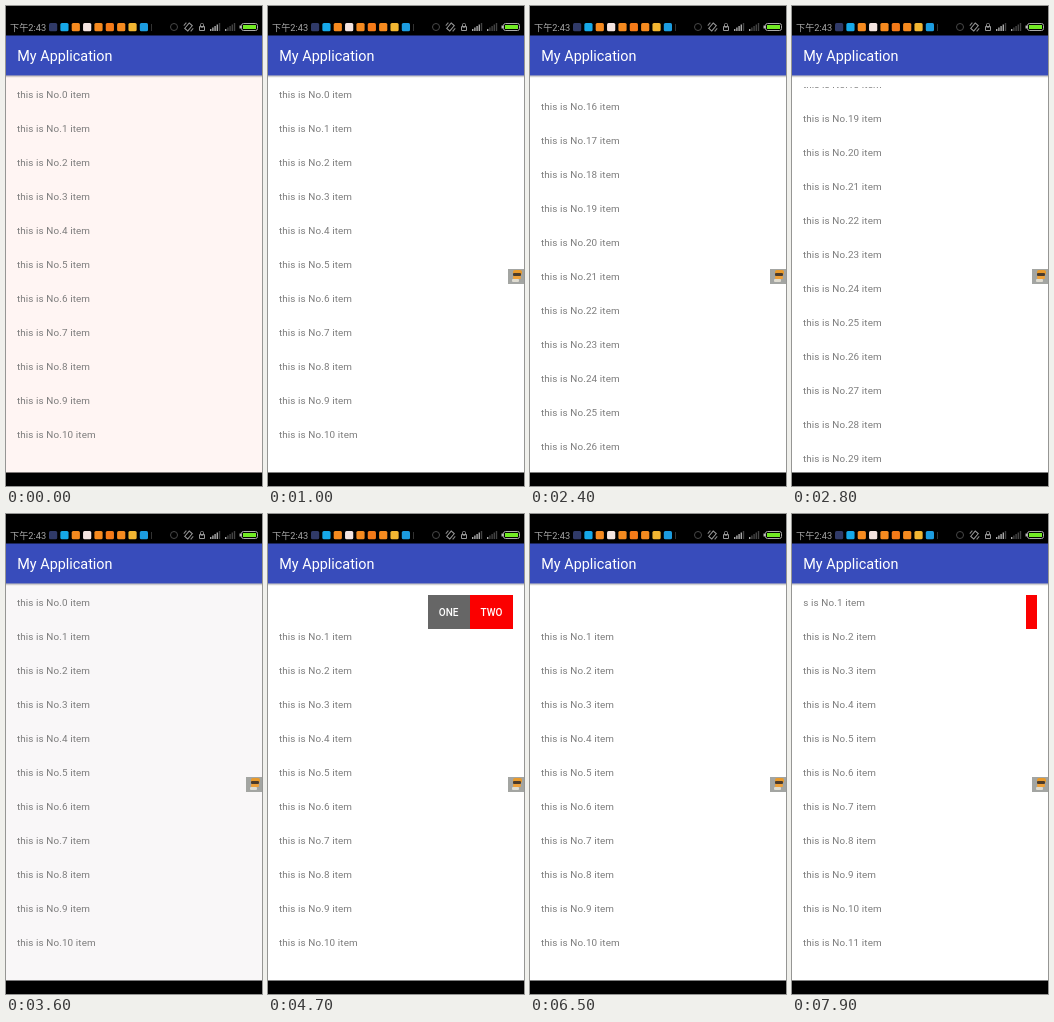
An HTML page with a canvas for the animation above (8000 ms loop, 256 by 480 pixels).

```html
<!DOCTYPE html>
<html lang="en">
<head>
<meta charset="utf-8">
<title>Swipe list</title>
<style>
  html, body { margin: 0; width: 100%; height: 100%; overflow: hidden; background: #000; }
  canvas { display: block; width: 256px; height: 480px; }
</style>
</head>
<body>
<canvas id="stage"></canvas>
<script>
const W = 256, H = 480, LOOP = 8000, STEP = 100;
const LIST = { x: 11, y: 81, w: 234, h: 375 };
const ROW = 34, COUNT = 30, MENU = 85;
const MAX_SCROLL = COUNT * ROW - LIST.h;
const REMOVED_AT = 6500;
const SANS = 'Roboto, sans-serif';

const canvas = document.getElementById('stage');
const ctx = canvas.getContext('2d');
const dpr = window.devicePixelRatio || 1;
canvas.width = W * dpr;
canvas.height = H * dpr;

// Eased 0 to 1 between two times
function ramp(t, from, to) {
  const p = Math.min(1, Math.max(0, (t - from) / (to - from)));
  return p * p * (3 - 2 * p);
}

function pose(t) {
  return {
    scroll: Math.round(MAX_SCROLL * (ramp(t, 1721, 2647) - ramp(t, 2700, 3580))),
    swipes: [
      MENU * (ramp(t, 4340, 4700) - ramp(t, 5000, 5600) + ramp(t, 5900, 6200)),
      11 * ramp(t, 7400, 7900)
    ],
    lift: Math.round(ROW * ramp(t, REMOVED_AT, 6900)),
    removed: t >= REMOVED_AT,
    warm: 1 - ramp(t, 0, 400),
    grey: ramp(t, 3400, 3600) - ramp(t, 3600, 4200)
  };
}

function rect(x, y, w, h, color, radius = 0) {
  ctx.fillStyle = color;
  ctx.beginPath();
  ctx.roundRect(x, y, w, h, radius);
  ctx.fill();
}

function label(text, x, y, font, color, spacing = 0) {
  ctx.font = font;
  ctx.letterSpacing = spacing + 'px';
  ctx.fillStyle = color;
  ctx.fillText(text, x, y);
}

function outline(x, y, w, h, color, radius = 0) {
  ctx.strokeStyle = color;
  ctx.lineWidth = 1;
  ctx.beginPath();
  ctx.roundRect(x, y, w, h, radius);
  ctx.stroke();
}

function signal(x, bright) {
  for (let i = 0; i < 5; i++) {
    rect(x + i * 2.2, 23 - i * 1.5, 1.4, 2 + i * 1.5, i < bright ? '#aaa' : '#444');
  }
}

function phone(x, y) {
  ctx.save();
  ctx.translate(x, y);
  ctx.rotate(0.7);
  outline(-2, -3.5, 4, 7, '#999');
  rect(-5, -2, 1, 4, '#888');
  rect(4, -2, 1, 4, '#888');
  ctx.restore();
}

function statusBar() {
  rect(0, 0, W, 30, '#000');
  label('下午2:43', 4, 24.5, '9.2px Roboto, "Noto Sans CJK SC", "Noto Sans CJK", sans-serif', '#a8a8a8');
  ['#303a68', '#16a8e8', '#f58a1f', '#f4e4e0', '#f58a1f', '#f47a18', '#f58a1f', '#f2b632', '#1c9ce0']
    .forEach((color, i) => rect(43 + i * 11.35, 17, 8.2, 8.2, color, 1.5));
  rect(145, 18, 1, 7, '#333');

  outline(164.5, 17.5, 7, 7, '#484848', 3.5);
  phone(182.5, 21);
  outline(194.5, 17.5, 3, 4, '#888', 1);
  outline(193.5, 20.5, 5, 4, '#999');
  signal(204, 4);
  signal(219, 1);

  rect(233.5, 19.5, 2, 3, '#bbb');
  outline(235.5, 17.5, 16, 7, '#aaa', 2);
  rect(237, 19, 13, 4, '#72ea24');
}

function toolbar() {
  rect(0, 29.6, W, 39.9, '#384cbb');
  rect(0, 69.5, W, 1, 'rgba(0,0,0,.28)');
  rect(0, 70.5, W, 1, 'rgba(0,0,0,.08)');
  label('My Application', 11.3, 55, '14.4px ' + SANS, '#fff');
}

function menu(y) {
  rect(160, y, 42, ROW, '#666');
  rect(202, y, 43, ROW, '#fb0000');
  label('ONE', 170.8, y + 21, '500 10px ' + SANS, '#fff');
  label('TWO', 212.6, y + 21, '500 10px ' + SANS, '#fff');
}

function list({ scroll, lift, swipes, removed }, paper) {
  ctx.save();
  ctx.beginPath();
  ctx.rect(LIST.x, LIST.y, LIST.w, LIST.h);
  ctx.clip();
  for (let i = removed ? 1 : 0; i < COUNT; i++) {
    const y = LIST.y + i * ROW - scroll - lift;
    const shift = swipes[i] || 0;
    if (shift > 0) {
      menu(y);
      rect(LIST.x - shift, y, LIST.w, ROW, paper);
    }
    label(`this is No.${i} item`, LIST.x - shift, y + 11, '9.9px ' + SANS, '#7c7c7c', 0.1);
  }
  ctx.restore();
}

function floatingBadge() {
  rect(240, 263, 16, 15, '#a3a5a2');
  rect(245, 264, 9, 5, '#e89a2c', 2);
  rect(245, 267, 8, 3, '#4c3b2a', 1);
  rect(245, 270, 8, 3, '#eda03a', 1);
  rect(244, 273, 7, 3, '#dedbd0', 1);
}

function draw(t) {
  const state = pose(t);
  const { warm, grey } = state;
  const paper = `rgb(${255 - 6 * grey},${255 - 10 * warm - 8 * grey},${255 - 12 * warm - 7 * grey})`;
  ctx.setTransform(dpr, 0, 0, dpr, 0, 0);
  rect(0, 0, W, H, paper);
  list(state, paper);
  statusBar();
  toolbar();
  if (t >= STEP) floatingBadge();
  rect(0, 466.6, W, 14, '#000');
}

const start = performance.now();
function frame(now) {
  const t = Math.max(0, now - start) % LOOP;
  draw(Math.floor(t / STEP) * STEP);
  requestAnimationFrame(frame);
}
draw(0);
requestAnimationFrame(frame);
</script>
</body>
</html>
```
